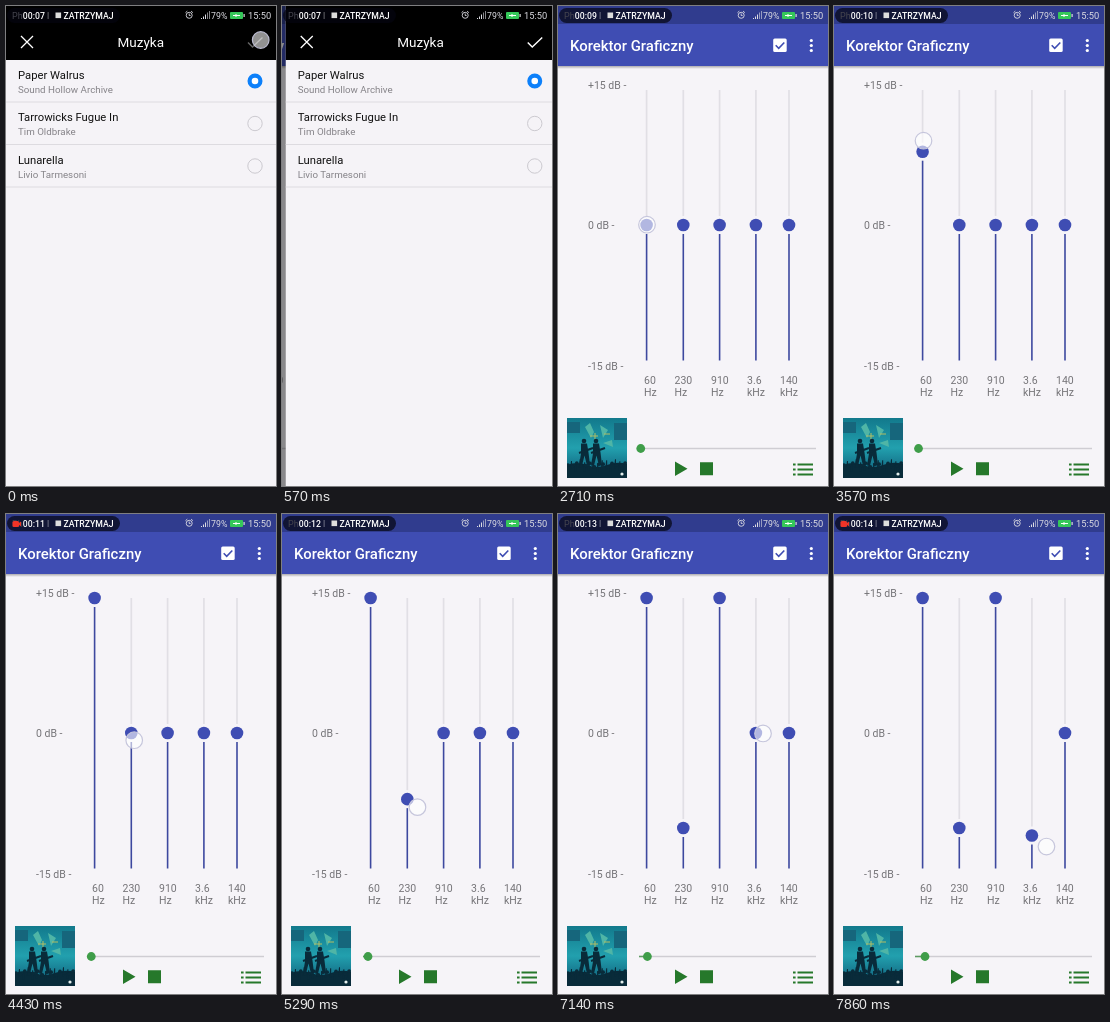
An HTML page for the animation above (8000 ms loop, 270x480 px).

```html
<!DOCTYPE html>
<html lang="pl">
<head>
<meta charset="utf-8">
<style>
html, body { margin: 0; width: 100%; height: 100%; overflow: hidden; background: #f6f4f8; }
svg { display: block; width: 270px; height: 480px; font-family: Roboto, sans-serif; }
</style>
</head>
<body>
<svg viewBox="0 0 270 480">
  <defs>
    <clipPath id="cover"><rect x="9" y="412" width="60" height="60"/></clipPath>
    <linearGradient id="sky" x2="0" y2="1">
      <stop offset="0" stop-color="#12798c"/><stop offset=".5" stop-color="#22a0ae"/><stop offset="1" stop-color="#0d5674"/>
    </linearGradient>
    <linearGradient id="shade" x2="0" y2="1">
      <stop offset="0" stop-color="#000" stop-opacity=".3"/><stop offset="1" stop-color="#000" stop-opacity="0"/>
    </linearGradient>
    <g id="guitarist">
      <circle cy="435" r="2.3"/>
      <path d="M-3 437.5h6l1.5 9 1.5 13h-3l-2.5-10-2.5 10h-3l2-12z"/>
      <path d="M-5 447l14-5" stroke="#092b3a" stroke-width="2"/>
    </g>
  </defs>

  <g id="player">
    <rect width="270" height="480" fill="#f6f4f8"/>
    <rect y="60" width="270" height="3" fill="url(#shade)"/>
    <rect width="270" height="60" fill="#3f4db3"/>
    <rect width="270" height="18" fill="#303c8e"/>
    <text x="12" y="45" font-size="14.9" font-weight="500" fill="#fff">Korektor Graficzny</text>
    <rect x="215.2" y="32.5" width="13.5" height="13.5" rx="1.5" fill="#fff"/>
    <path d="M217.7 39.3l3 3 5.6-5.8" fill="none" stroke="#3f4db3" stroke-width="1.6"/>
    <g fill="#fff"><circle cx="253.3" cy="34.5" r="1.6"/><circle cx="253.3" cy="39.5" r="1.6"/><circle cx="253.3" cy="44.5" r="1.6"/></g>
    <g fill="#757478" font-size="10.5">
      <text x="30" y="83">+15 dB -</text><text x="30" y="223">0 dB -</text><text x="30" y="363.5">-15 dB -</text>
      <g id="bands"></g>
    </g>
    <g clip-path="url(#cover)">
      <rect x="9" y="412" width="60" height="60" fill="url(#sky)"/>
      <path d="M9 416h13v11h-13zM56 417h13v17h-13z" fill="#16667c"/>
      <path d="M27 421l5-4 4 9-3 6zM42 419l8 5-5 8zM45 437l9-3 1 7z" fill="#4fb5a6"/>
      <path d="M32 430h8M37 427v7M46 428h6" stroke="#b3bd62" stroke-width="1"/>
      <g id="crowd" fill="#092b3a">
        <path d="M9 459q10-4 20 0t20 0 20-1v14h-60z"/>
        <use href="#guitarist" x="26"/><use href="#guitarist" x="38"/>
      </g>
      <circle cx="64" cy="468" r="1.6" fill="#e5f0ee"/>
    </g>
    <path d="M81 442.5H258" stroke="#cfcdd3" stroke-width="1.5"/>
    <path id="played" stroke="#5d9c63" stroke-width="1.5"/>
    <circle id="head" cy="442.5" r="4.4" fill="#3f9d49"/>
    <g fill="#26782b">
      <path d="M117 455.5L129.5 462.8 117 470zM142 456.3h13v13h-13z"/>
      <path d="M235 457.5h2.6v2h-2.6zM235 462.5h2.6v2h-2.6zM235 467.5h2.6v2h-2.6zM239.5 457.5H255v2h-15.5zM239.5 462.5H255v2h-15.5zM239.5 467.5H255v2h-15.5z"/>
    </g>
  </g>

  <rect id="dim" width="270" height="480"/>

  <g id="music">
    <rect width="270" height="480" fill="#f5f3f7"/>
    <rect width="270" height="54" fill="#000"/>
    <path d="M15 30l12 12M27 30l-12 12" stroke="#fff" stroke-width="1.3"/>
    <text x="111.5" y="41" font-size="13.5" fill="#fff">Muzyka</text>
    <path id="tick" d="M242 36.5l4.5 4.5 10-9.5" fill="none" stroke="#fff" stroke-width="1.4"/>
    <g id="songs"></g>
  </g>

  <text x="6" y="13" font-size="9" fill="#dcdce2">Ph</text>
  <rect x="1" y="2" width="113" height="15" rx="7.5" fill="#050510" fill-opacity=".7"/>
  <g id="rec" fill="#f03428"><rect x="6.5" y="7" width="6.5" height="6" rx="1.5"/><path d="M12 10l3-2.5v5z"/></g>
  <g fill="#fff">
    <text id="clock" x="16.8" y="13" font-size="8.7" font-weight="500"></text>
    <rect x="41.5" y="6" width="1.3" height="7" opacity=".3"/>
    <rect x="49.5" y="6.5" width="5.6" height="5.6" fill="#ddd"/>
    <text x="57.5" y="13" font-size="8.7" font-weight="500">ZATRZYMAJ</text>
    <g fill="#dcdce2">
      <text x="205" y="13" font-size="8.8">79%</text>
      <text x="242" y="13" font-size="9.3">15:50</text>
      <path d="M195 12h1v1h-1zM197 10.5h1v2.5h-1zM199 8.5h1v4.5h-1z"/>
      <path d="M201 6.5h1v6.5h-1zM203 5h1v8h-1z" opacity=".6"/>
    </g>
  </g>
  <g fill="none" stroke="#dcdce2" stroke-width=".9">
    <circle cx="183.2" cy="9.3" r="3"/><path d="M183.2 7.5v2h1.4M179.5 6.7l1.8-1.6M186.9 6.7l-1.8-1.6"/>
  </g>
  <rect x="224" y="6" width="13" height="7" rx="1" fill="#35c759"/>
  <path d="M237.5 8h1.2v3h-1.2z" fill="#ddd"/>
  <path d="M227 9.5h7M230 8v3" stroke="#fff" stroke-width="1"/>

  <circle id="touch" r="8.3" fill="#fff" fill-opacity=".6" stroke="#c6c6dc" stroke-width="1.2"/>
</svg>
<script>
const LOOP = 8000, STEP = 1000 / 7;
const MID = 219, TOP = 84, BOTTOM = 354, SLOP = 11;
const $ = id => document.getElementById(id);
const set = (el, attrs) => { for (const k in attrs) el.setAttribute(k, attrs[k]); };
const clamp = (v, lo, hi) => Math.min(hi, Math.max(lo, v));

// Linear interpolation through [time, value...] keys
function track(keys, t, i = 1) {
  if (t <= keys[0][0]) return keys[0][i];
  for (let k = 1; k < keys.length; k++) {
    const a = keys[k - 1], b = keys[k];
    if (t < b[0]) return a[i] + (b[i] - a[i]) * (t - a[0]) / (b[0] - a[0]);
  }
  return keys[keys.length - 1][i];
}

// Each drag is a finger path: [time, x, y]
const bands = [
  { x: 88.6, tx: 86, label: '60', unit: 'Hz', drag: [[2710, 89, 219], [3140, 89, 190], [3570, 89.5, 135], [3860, 91, 72]] },
  { x: 125.3, tx: 116.5, label: '230', unit: 'Hz', drag: [[4290, 127, 216], [4860, 132, 258], [5290, 135.5, 293.5], [5860, 138, 322]] },
  { x: 161.6, tx: 153, label: '910', unit: 'Hz', drag: [[6000, 165, 218], [6290, 168, 166], [6720, 169, 71]] },
  { x: 197.9, tx: 189, label: '3.6', unit: 'kHz', drag: [[7140, 205, 219], [7860, 212.5, 333]] },
  { x: 231, tx: 222, label: '140', unit: 'kHz' }
];
const progress = [[1860, 81], [3570, 84.5], [5290, 86], [6290, 87.5], [7860, 91]];
const recording = [[1290, 1860], [2290, 2710], [4290, 4710], [7290, 8000]];
const songs = [
  ['Paper Walrus', 'Sound Hollow Archive'],
  ['Tarrowicks Fugue In', 'Tim Oldbrake'],
  ['Lunarella', 'Livio Tarmesoni']
];

$('bands').innerHTML = bands.map((b, i) => `
  <text x="${b.tx}" y="378">${b.label}</text><text x="${b.tx}" y="390">${b.unit}</text>
  <path id="rest${i}" stroke="#e1dfe5" stroke-width="1.7"/>
  <path id="fill${i}" stroke="#3d489f" stroke-width="1.6"/>
  <circle id="knob${i}" cx="${b.x}" r="6.3" fill="#3f4db3"/>`).join('');

$('songs').innerHTML = songs.map(([title, artist], i) => {
  const y = 75 + i * 42.5;
  const radio = i ? `<circle cx="249" cy="${y}" r="7.2" fill="none" stroke="#cccad0"/>`
    : `<circle cx="249" cy="${y}" r="5.4" fill="#fff" stroke="#0d80fa" stroke-width="4.2"/>`;
  return `<text x="12" y="${y - 2.3}" font-size="11.25" fill="#111">${title}</text>
    <text x="12" y="${y + 11.7}" font-size="9.75" fill="#858388">${artist}</text>${radio}
    <path d="M0 ${y + 21}H270" stroke="#dddbe0"/>`;
}).join('');

// Crowd of heads and raised arms along the bottom of the cover
let crowd = '';
for (let i = 0; i < 14; i++) {
  const x = 10 + i * 4.4, y = 459 + 2 * Math.sin(i * 2.3);
  crowd += `<circle cx="${x}" cy="${y}" r="1.8"/><path d="M${x + 2} ${y + 5}l1-9h1v9z"/>`;
}
$('crowd').innerHTML += crowd;

function draw(t) {
  const u = clamp((t - 470) / 670, 0, 1);
  const p = u < .5 ? 4 * u ** 3 : 1 - 4 * (1 - u) ** 3;
  set($('music'), { transform: `translate(${270 * p} 0)` });
  set($('player'), { transform: `translate(${135 * (p - 1)} 0)` });
  set($('dim'), { opacity: .45 * (1 - p) });

  let x = 254.7, y = 34, touch = .95 * clamp(1 - (t - 140) / 290, 0, 1);
  set($('tick'), { opacity: t < 280 ? .4 : 1 });

  bands.forEach((b, i) => {
    let knob = MID;
    if (b.drag) {
      const fy = track(b.drag, t, 2), d = fy - b.drag[0][2];
      knob = clamp(MID + Math.sign(d) * Math.max(0, Math.abs(d) - SLOP), TOP, BOTTOM);
      if (t >= b.drag[0][0] - 5 && t <= b.drag[b.drag.length - 1][0] + 140) {
        x = track(b.drag, t); y = fy; touch = 1;
      }
    }
    set($('knob' + i), { cy: knob });
    set($('rest' + i), { d: `M${b.x} ${TOP}V${Math.max(TOP, knob - 9)}` });
    set($('fill' + i), { d: `M${b.x} ${knob + 9}V${BOTTOM + .5}` });
  });
  set($('touch'), { cx: x, cy: y, opacity: touch });

  const head = track(progress, t);
  set($('head'), { cx: head });
  set($('played'), { d: `M81 442.5H${head}` });
  $('clock').textContent = '00:' + String(7 + Math.max(0, Math.floor((t - 280) / 1000))).padStart(2, '0');
  set($('rec'), { opacity: recording.some(([a, b]) => t >= a - 5 && t < b - 5) ? 1 : 0 });
}

function loop(now) {
  draw(Math.floor((now % LOOP + 5) / STEP) * STEP);
  requestAnimationFrame(loop);
}
draw(0);
requestAnimationFrame(loop);
</script>
</body>
</html>
```
